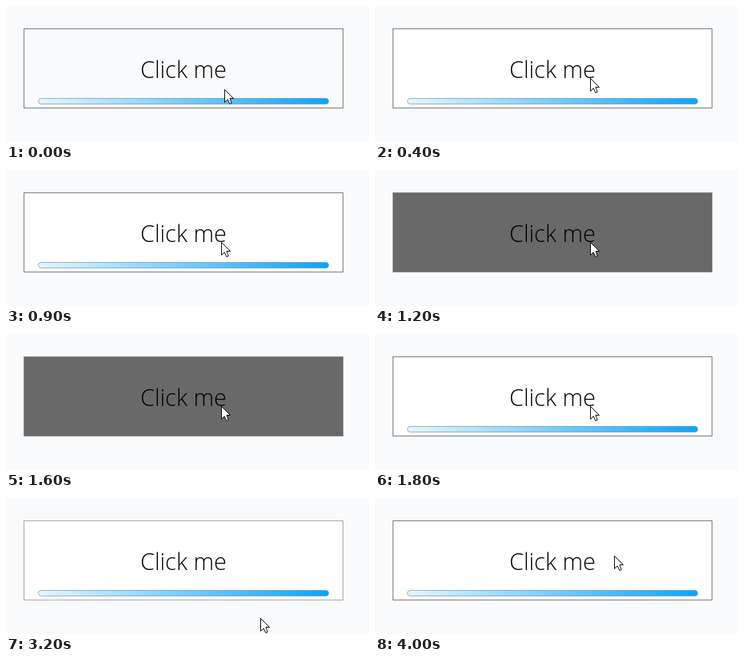
An HTML page that plays this animation: 454 by 170 pixels, repeating every 4.7 s.

```html
<!DOCTYPE html>
<html lang="en">
<head>
<meta charset="utf-8">
<title>Button states</title>
<style>
  html, body { margin: 0; width: 100%; height: 100%; overflow: hidden; background: #f8fafc; }
  svg { display: block; }
  text { font: 350 29px "Open Sans", "Noto Sans", sans-serif; }
</style>
</head>
<body>
<svg width="454" height="170" viewBox="0 0 454 170">
  <linearGradient id="blue">
    <stop offset="0" stop-color="#e4f6ff"/>
    <stop offset="1" stop-color="#08a4ff"/>
  </linearGradient>
  <rect id="box" x="22.5" y="28.5" width="399" height="99"/>
  <rect id="bar" x="40.5" y="115.5" width="363" height="7" rx="3.5"
        fill="url(#blue)" stroke="#6b8796" stroke-opacity=".6"/>
  <text x="222" y="90" text-anchor="middle">Click me</text>
  <path id="cursor" d="M.5.5V16.5L4.2 12.8 6.8 18.5 9.2 17.6 7 11.5H11.5Z" fill="#fff" stroke="#111"/>
</svg>
<script>
const LOOP = 4700, STEP = 100, PRESS = 200;
const [box, bar, cursor] = ["box", "bar", "cursor"].map(id => document.getElementById(id));

const presses = [200, 700, 1200, 1600];
// Turning points of the pointer: time in ms, x, y
const path = [
  [0, 273, 104], [100, 269, 90], [2100, 269, 90], [2500, 290, 166], [2900, 279, 84],
  [3000, 279, 84], [3200, 318, 150], [3300, 318, 150], [3500, 288, 90], [3800, 300, 154],
  [4000, 299, 72], [LOOP, 299, 72]
];

function pointerAt(t) {
  const i = path.findIndex(p => p[0] > t);
  const [t0, x0, y0] = path[i - 1], [t1, x1, y1] = path[i];
  const k = (t - t0) / (t1 - t0);
  return [Math.round(x0 + (x1 - x0) * k), Math.round(y0 + (y1 - y0) * k)];
}

function draw(now) {
  const t = Math.floor(now % LOOP / STEP) * STEP;
  const [x, y] = pointerAt(t);
  const pressed = presses.some(p => t >= p && t < p + PRESS);
  box.setAttribute("fill", pressed ? "#696969" : t < STEP ? "#f9fafc" : "#fff");
  box.setAttribute("stroke", y < 128 ? "#808080" : "#a9a9a9");
  bar.style.display = pressed ? "none" : "";
  cursor.setAttribute("transform", `translate(${x} ${y})`);
}

const start = performance.now();
function tick() {
  draw(performance.now() - start);
  requestAnimationFrame(tick);
}
tick();
</script>
</body>
</html>
```
